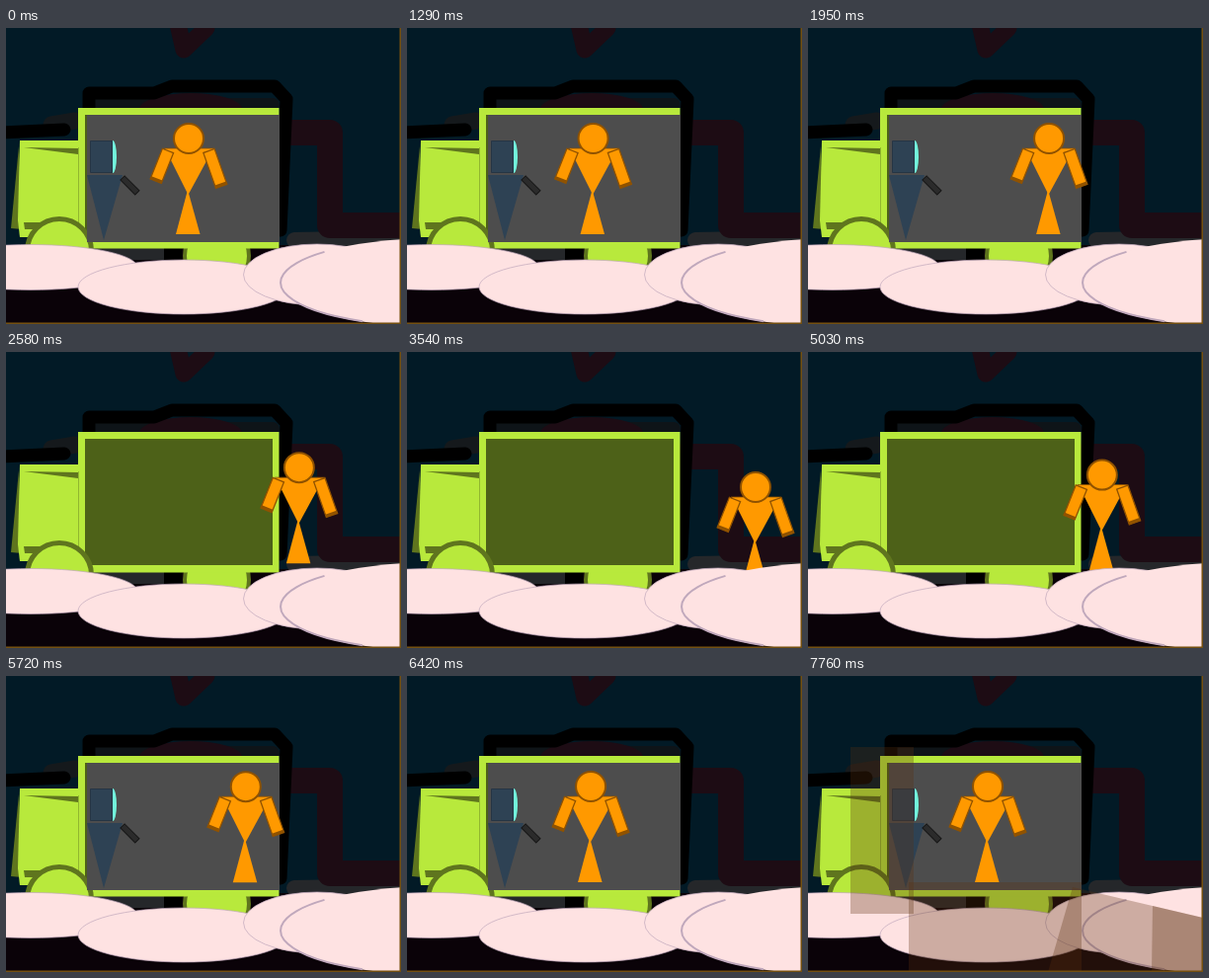
An HTML page with a canvas that plays this animation: 400 by 300 pixels, repeating every 8 s.

```html
<!DOCTYPE html>
<html lang="en">
<head>
<meta charset="utf-8">
<title>Truck in the clouds</title>
<style>
html, body { margin: 0; width: 100%; height: 100%; overflow: hidden; background: #021a26; }
canvas { display: block; width: 400px; height: 300px; }
</style>
</head>
<body>
<canvas id="stage" width="400" height="300"></canvas>
<script>
const ctx = document.getElementById('stage').getContext('2d');
const LOOP = 8000, FLASH_AT = 7760;
const FLOOR = 112, DOOR_X = 271, FAR_X = 353, DROP = 25;
const LIME = '#b8e93c', OLIVE = '#5f751e', DOOR = '#4d6118';
const ORANGE = '#ff9900', RUST = '#8f5200', PINK = '#fee2e2', RIM = '#c0a8bc';
const RED = '#1d0c14', STEEL = '#2e4254', BROWN = '#745010';

// Each drag moves the figure to x at an even pace.
const START_X = 185, TURN = 4390;
const DRAGS = [
  { from: 460, to: 540, x: 175 },
  { from: 1130, to: 1950, x: 244 },
  { from: 1950, to: 2750, x: 311 },
  { from: 2780, to: 3540, x: FAR_X },
  { from: TURN, to: 5180, x: 285 },
  { from: 5180, to: 6000, x: 221 },
  { from: 6000, to: 6470, x: 182 }
];

const clamp = v => Math.min(1, Math.max(0, v));

function place(t) {
  let x = START_X;
  for (const d of DRAGS) x += (d.x - x) * clamp((t - d.from) / (d.to - d.from));
  // A curved way down, a straight way back up.
  const fall = t < TURN
    ? clamp((x - 250) / (FAR_X - 250)) ** 2
    : clamp((x - 242) / (FAR_X - 242));
  return [x, FLOOR + DROP * fall];
}

function paint(fill, stroke, width = 1) {
  if (fill) { ctx.fillStyle = fill; ctx.fill(); }
  if (stroke) { ctx.strokeStyle = stroke; ctx.lineWidth = width; ctx.stroke(); }
}

function rect(x, y, w, h, fill, stroke, width) {
  ctx.beginPath();
  ctx.rect(x, y, w, h);
  paint(fill, stroke, width);
}

function poly(fill, ...pts) {
  ctx.beginPath();
  for (const [x, y] of pts) ctx.lineTo(x, y);
  ctx.closePath();
  paint(fill);
}

function oval(x, y, rx, ry, fill, stroke, width) {
  ctx.beginPath();
  ctx.ellipse(x, y, rx, ry, 0, 0, Math.PI * 2);
  paint(fill, stroke, width);
}

function brush(color, width, ...pts) {
  ctx.beginPath();
  for (const [x, y] of pts) ctx.lineTo(x, y);
  paint(null, color, width);
}

function turned(x, y, angle, body) {
  ctx.save();
  ctx.translate(x, y);
  ctx.rotate(angle);
  body();
  ctx.restore();
}

function backdrop() {
  rect(0, 0, 400, 300, '#021a26');
  rect(0, 220, 400, 80, '#0a0208');
  ctx.save();
  ctx.lineCap = ctx.lineJoin = 'round';
  brush(RED, 17, [174, -4], [180, 22], [203, 0]);
  brush('#15191c', 17, [46, 98], [70, 94]);
  brush('#0e1418', 14, [94, 78], [270, 78]);
  oval(187, 82, 52, 16, RED);
  brush('#25272a', 16, [292, 215], [400, 213]);
  brush(RED, 26, [280, 106], [328, 106], [328, 200], [400, 200]);
  brush('#000', 13, [-4, 106], [59, 103]);
  brush('#000', 13, [84, 82], [84, 66], [150, 66], [168, 59], [272, 59], [284, 72], [278, 205]);
  ctx.restore();
  rect(84, 219, 80, 16, '#25272a');
  rect(160, 222, 18, 16, '#000');
}

function truck() {
  oval(213.5, 231, 32.5, 32.5, LIME, OLIVE, 4);
  poly(OLIVE, [13, 120], [16, 204], [5, 203]);
  poly(LIME, [14, 114], [78, 114], [78, 212], [14, 212], [12, 195]);
  poly(OLIVE, [18, 121], [73, 122], [73, 128]);
  poly(OLIVE, [18, 197], [37, 197], [29, 204], [19, 204]);
  rect(73, 81, 203.5, 142.5, LIME);
  brush('#91b72f', 1, [73.5, 121], [73.5, 205]);
  rect(80, 88, 190, 128, DOOR);
  oval(54, 226, 32.5, 32.5, LIME, OLIVE, 5);
}

function cabin() {
  rect(82, 88, 195, 129, '#4d4d4d');
  rect(85.5, 114.5, 22, 32, STEEL, '#263544');
  ctx.beginPath();
  ctx.ellipse(108, 130.5, 4, 16.5, 0, -Math.PI / 2, Math.PI / 2);
  paint('#72f5dc');
  poly(STEEL, [82, 149], [118, 149], [99, 215]);
  turned(118, 152, Math.PI / 4, () => rect(0, -3, 21, 6, '#2b2b2b', '#161616'));
}

function arm(x, length, angle) {
  turned(x, 12.5, angle, () => {
    rect(-6, 0, 12, length, ORANGE, RUST, 1.3);
    rect(-6, length - 3, 12, 3, RUST);
  });
}

function figure(x, y) {
  turned(x, y, 0, () => {
    poly(ORANGE, [-1, 52], [11.5, 97], [-13, 97]);
    poly(ORANGE, [-24, 10], [25, 10], [-0.5, 57]);
    brush(RUST, 0.8, [-25, 10], [26, 10]);
    oval(0, 0, 15, 15, ORANGE, RUST, 2);
    arm(-21, 33, 0.38);
    arm(20.5, 38, -0.34);
  });
}

function clouds() {
  oval(25, 242.5, 108, 23, PINK, RIM, 0.7);
  oval(180, 262.5, 107, 27.5, PINK, RIM, 0.7);
  oval(315, 250, 74.5, 31, PINK, RIM, 0.7);
  oval(430, 258, 152.5, 44.5, PINK);
  ctx.beginPath();
  ctx.ellipse(430, 258, 152, 44, 0, Math.PI * 0.65, Math.PI * 1.25);
  paint(null, RIM, 2);
}

function shade() {
  const tint = 'rgba(90,46,16,0.3)';
  rect(43, 72, 64, 169, tint);
  rect(102, 209, 175, 91, tint);
  poly(tint, [268, 214], [400, 245], [400, 300], [243, 300]);
  poly(tint, [349, 233], [400, 245], [400, 300], [348, 300]);
}

function draw(t) {
  const [x, y] = place(t);
  backdrop();
  truck();
  if (x < DOOR_X) cabin();
  figure(x, y);
  clouds();
  if (t >= FLASH_AT) shade();
  rect(398.5, 0, 1.5, 300, BROWN);
  rect(0, 298.5, 400, 1.5, BROWN);
}

const start = performance.now();
function tick() {
  draw((performance.now() - start) % LOOP);
  requestAnimationFrame(tick);
}
tick();
</script>
</body>
</html>
```
